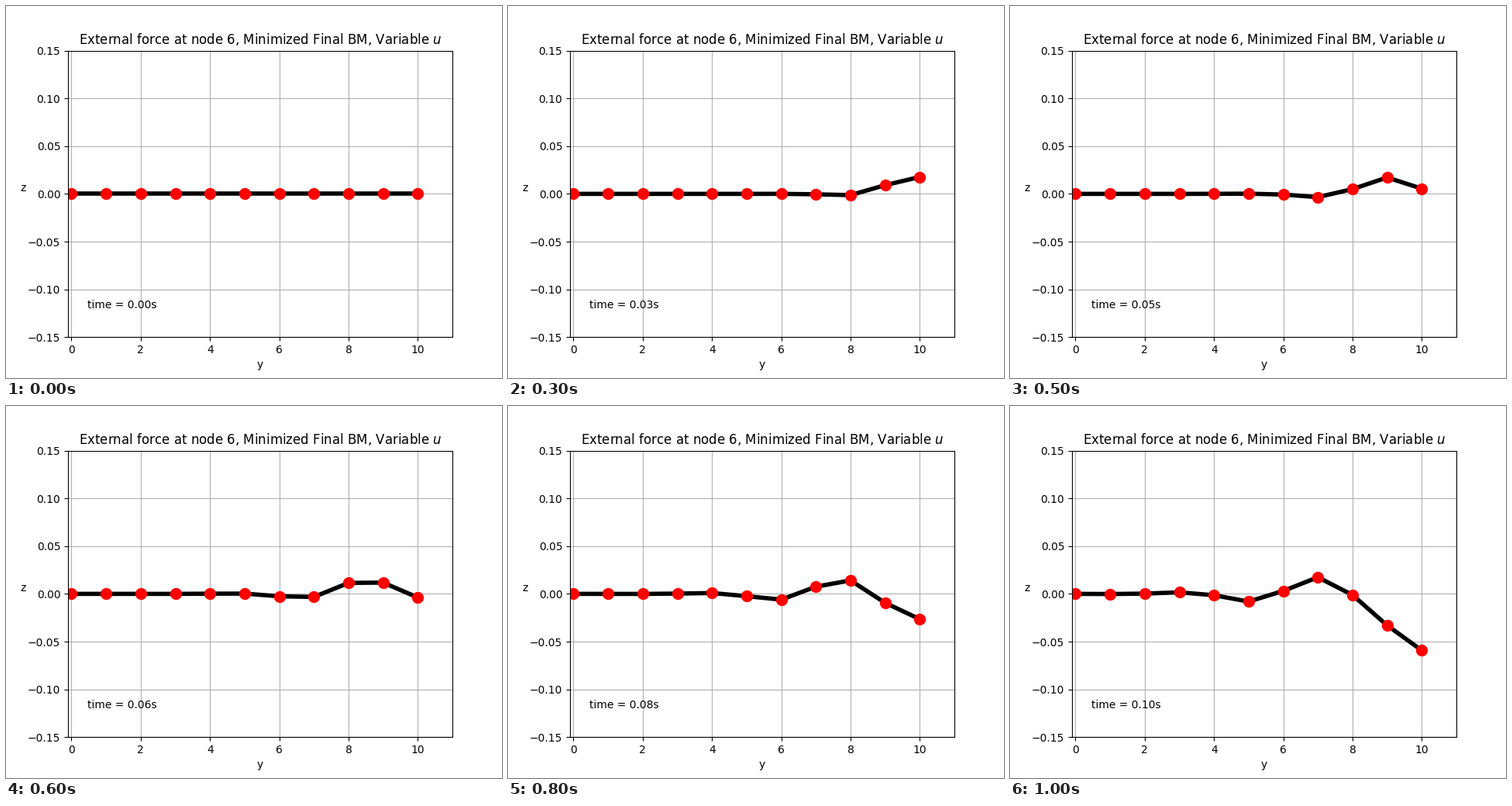
A matplotlib script for the animation above (1.1 s loop, 640 by 480 pixels).

```python
import matplotlib.pyplot as plt
import numpy as np
from matplotlib.animation import FuncAnimation

STEPS = 11
NODES = 11
DT = 0.01          # seconds shown per step
STIFFNESS = 0.09   # bending stiffness / mass, in node and step units
SUBSTEPS = 50

# Motion of the two driven nodes at the free end, as smooth curves through key points
KEYS = [0, 1, 2, 4, 6, 8, 9, 10]


def curve(values):
    return np.polyfit(KEYS, np.array(values) * 1e-4, len(KEYS) - 1)


DRIVEN = (
    curve([0, -3, 20, 158, 118, -94, -201, -330]),   # node 9
    curve([0, 64, 154, 134, -38, -265, -419, -592]),  # node 10
)


def bend():
    """Integrate a beam clamped at node 0 and return its shape at every step."""
    w = np.zeros(NODES)
    v = np.zeros(NODES - 3)
    h = 1 / SUBSTEPS
    shapes = [w.copy()]
    for k in range(1, (STEPS - 1) * SUBSTEPS + 1):
        clamped = np.r_[w[1], w]  # mirrored node gives zero slope at the root
        v -= STIFFNESS * np.diff(clamped, 4) * h
        w[1:-2] += v * h
        w[-2:] = [np.polyval(c, k * h) for c in DRIVEN]
        if k % SUBSTEPS == 0:
            shapes.append(w.copy())
    return shapes


z = bend()
y = np.arange(NODES)

plt.rcParams["font.family"] = "DejaVu Sans"
fig, ax = plt.subplots(figsize=(6.4, 4.8), dpi=100)
ax.set(xlim=(-0.1, 11), ylim=(-0.15, 0.15), xlabel="y")
ax.set_ylabel("z", rotation=0)
ax.set_title("External force at node 6, Minimized Final BM, Variable $u$")
ax.grid()

beam, = ax.plot(y, z[0], "k-", lw=4)
joints, = ax.plot(y, z[0], "ro", ms=10)
clock = ax.text(0.05, 0.1, "", transform=ax.transAxes)


def update(i):
    beam.set_ydata(z[i])
    joints.set_ydata(z[i])
    clock.set_text(f"time = {i * DT:.2f}s")
    return beam, joints, clock


anim = FuncAnimation(fig, update, frames=STEPS, interval=100, repeat=True)
plt.show()
```
